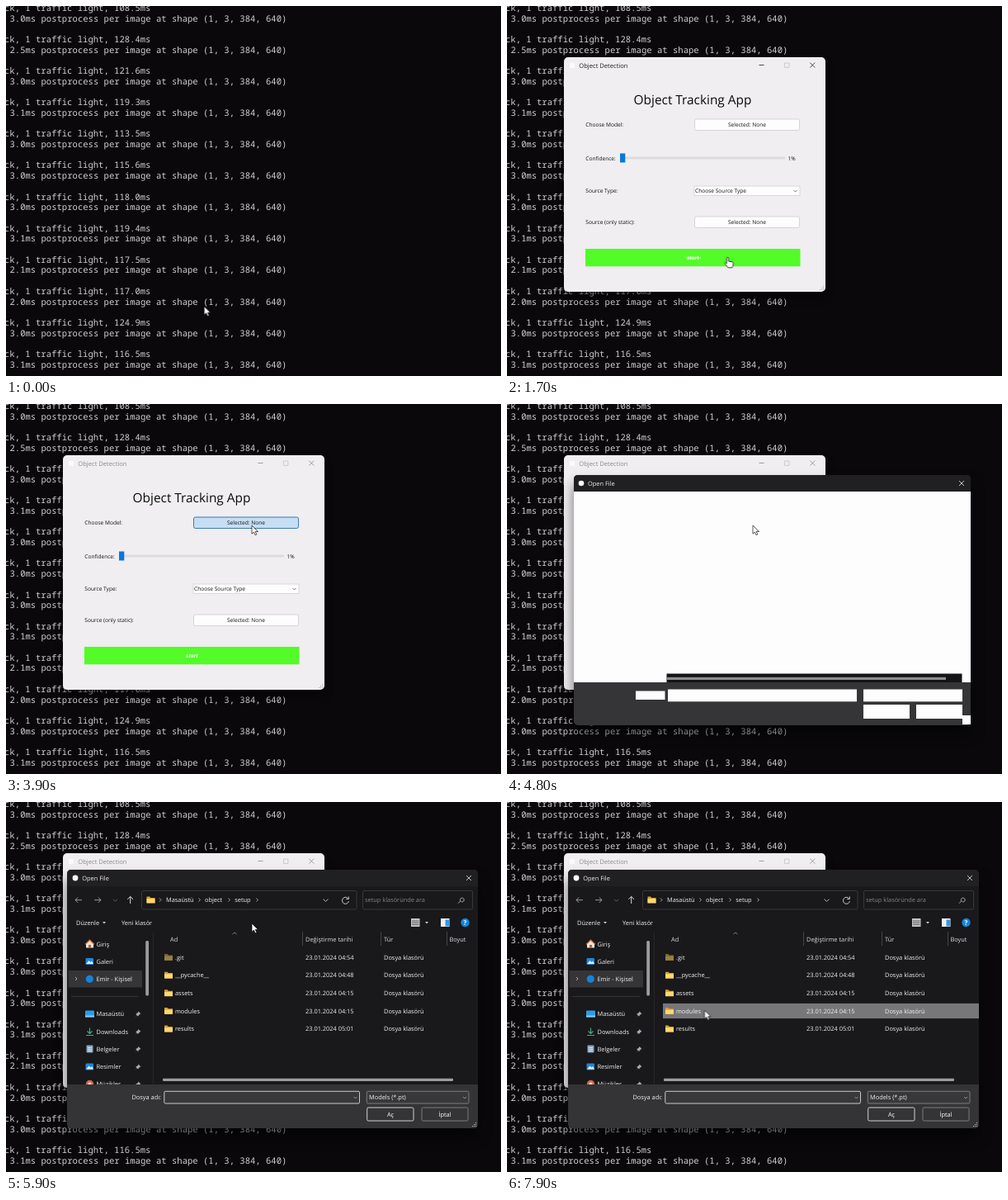
Animation, 600 px wide and 448 px high, one loop 8000 ms. Source, as an HTML page:

```html
<!DOCTYPE html>
<html lang="en">
<head>
<meta charset="utf-8">
<title>Object tracking demo</title>
<style>
  html, body { margin: 0; width: 100%; height: 100%; overflow: hidden; background: #0a080b; }
  svg { display: block; width: 600px; height: 448px; }
  text { font-family: "Open Sans", "Noto Sans", sans-serif; text-rendering: geometricPrecision; white-space: pre; }
  .mono { font-family: "Noto Sans Mono", "DejaVu Sans Mono", monospace; font-weight: 500; }
  filter { color-interpolation-filters: sRGB; }
  #app { transform-origin: 227.5px 204px; }
  #skeleton { transform-origin: 321.5px 237.5px; }
</style>
</head>
<body>
<svg id="stage" viewBox="0 0 600 448" xmlns="http://www.w3.org/2000/svg"></svg>
<script>
const LOOP = 8000, STEP = 100;

// Drawing helpers, each returning SVG markup
const text = (x, y, str, size = 7.4, fill = '#f1f0f2', more = '') =>
  `<text x="${x}" y="${y}" font-size="${size}" fill="${fill}" ${more}>${str}</text>`;
const mid = 'text-anchor="middle"';
const rect = (x, y, x2, y2, fill, more = '') =>
  `<rect x="${x}" y="${y}" width="${x2 - x}" height="${y2 - y}" fill="${fill}" ${more}/>`;
const line = (d, stroke = '#ddd', width = 0.9, more = '') =>
  `<path d="${d}" fill="none" stroke="${stroke}" stroke-width="${width}" ${more}/>`;
const circle = (x, y, r, fill) => `<circle cx="${x}" cy="${y}" r="${r}" fill="${fill}"/>`;
const group = (id, body, more = '') => `<g id="${id}" ${more}>${body}</g>`;
const cross = (x, y, color) => line(`M${x - 3} ${y - 3}l6 6m0-6l-6 6`, color, 0.8);
const down = (x, y, color = '#ccc', r = 2.5) => line(`M${x - r} ${y - r / 2}l${r} ${r}l${r}-${r}`, color, 0.8);
const right = (x, y, color = '#ccc') => line(`M${x - 1} ${y - 2}l2 2l-2 2`, color, 0.8);
const triangle = (x, y) => `<path d="M${x - 2} ${y - 1}h4l-2 2.4z" fill="#ccc"/>`;
const folder = (x, y, more = '') =>
  `<g ${more}><path d="M${x} ${y - 4}h3.6l1.2 1.4h5.2v6.6h-10z" fill="#d99d2b"/>` +
  `<path d="M${x} ${y - 1.4}h10v5.2h-10z" fill="#ffd870"/></g>`;
const grip = (x, y, color) => [[0, 0], [-2, 0], [-4, 0], [0, -2], [-2, -2], [0, -4]]
  .map(([dx, dy]) => rect(x + dx, y + dy, x + dx + 1, y + dy + 1, color)).join('');

function terminal() {
  const speeds = [108.5, 128.4, 121.6, 119.3, 113.5, 115.6, 118, 119.4, 117.5, 117, 124.9, 116.5];
  const posts = [3, 2.5, 3, 3.1, 3, 3, 3, 3.1, 2.1, 2, 3, 3.1];
  const row = (x, y, str) => text(x, y, str, 10.57, '#d2d0d3', 'class="mono"');
  return speeds.map((ms, i) => {
    const y = 5.8 + i * 38.12;
    return row(-2, y, `ck, 1 traffic light, ${ms.toFixed(1)}ms`) +
      row(4.5, y + 12.7, `${posts[i].toFixed(1)}ms postprocess per image at shape (1, 3, 384, 640)`);
  }).join('');
}

function appWindow() {
  const ink = '#151515';
  const label = (x, y, str, more) => text(x, y, str, 6.6, ink, more);
  const button = (y, id) =>
    rect(227.5, y, 354.5, y + 13.5, '#fdfdfd', `id="${id}" rx="2" stroke="#d2d0d3" stroke-width=".9"`) +
    label(291, y + 9.2, 'Selected: None', mid);
  return rect(69, 62, 386, 346, '#f0eef0', 'rx="5" filter="url(#shadow)"') +
    rect(76, 69, 82, 75, '#fbfafb') +
    text(87.3, 74.7, 'Object Detection', 7.6, 'currentColor') +
    line('M305.5 71.5h6', 'currentColor', 0.8) +
    line('M336.5 69h5.4v5.4h-5.4z', '#c4c2c5', 0.8) +
    cross(370.3, 71.6, 'currentColor') +
    text(225, 118.6, 'Object Tracking App', 15.4, '#0c0c0c', mid) +
    label(95.3, 146.2, 'Choose Model:') + button(137, 'model') +
    label(95.3, 187, 'Confidence:') + label(340.5, 187, '1%') +
    rect(137, 182.6, 337, 185.4, '#dcdadd') + rect(137, 178.5, 143.3, 189.5, '#0a78d6') +
    label(95.3, 226.2, 'Source Type:') +
    rect(227, 218, 355, 229.5, '#fdfdfd', 'stroke="#d2d0d3" stroke-width=".8"') +
    label(228, 226.2, 'Choose Source Type') + down(349.5, 224, '#555', 2) +
    label(95.3, 264.2, 'Source (only static):') + button(255, 'source') +
    rect(95, 294, 355.5, 315.3, '#53fb29') +
    text(225.5, 306.6, 'start', 6.4, '#fff', `${mid} font-weight="700" font-style="italic"`) +
    group('strike', line('M216 305h19', '#f4fff0', 0.8)) +
    grip(383, 343, '#aaa8ab');
}

function skeleton() {
  const blocks = [[156, 347.5, 191.5, 358], [195, 345.5, 424, 360.3], [432, 345.5, 552, 360.3],
    [432, 364, 488, 381], [496, 364, 552, 381], [552, 377, 562, 388]];
  return rect(81, 86, 562, 389, '#353436', 'rx="5" filter="url(#deepShadow)"') +
    `<path d="M81 106v-15q0-5 5-5h471q5 0 5 5v15z" fill="#201f21"/>` +
    circle(90, 96, 3.3, '#fff') + text(98, 98.8, 'Open File') + cross(551, 96, '#eee') +
    rect(81, 106, 562, 337, '#fdfdfe') + rect(193.5, 326.5, 551.5, 337, '#141315') +
    rect(194, 330.8, 532, 334, '#8e8d8f') +
    blocks.map(b => rect(...b, '#fdfdfe')).join('');
}

function sidebar() {
  const picture = y => rect(96.5, y - 4, 106, y + 4, '#1f86d8', 'rx="1"') +
    `<path d="M97 ${y + 3}l3.5-4 2 2 1.5-1.5 2 3.5z" fill="#dff1ff"/>`;
  const icons = {
    home: y => `<path d="M97 ${y}l4.5-4.5 4.5 4.5v4.5h-9z" fill="#f0e3d8"/>` +
      line(`M96 ${y + .4}l5.5-5.2 5.5 5.2`, '#e0733c', 1.3) + rect(100, y + 1, 103, y + 4.5, '#b0643c'),
    picture,
    cloud: y => circle(101.3, y, 4.6, '#1683d8'),
    desktop: y => rect(96, y - 4, 107, y + 4, '#2e9be6', 'rx="1"') + rect(96, y + 2, 107, y + 4, '#85cbf5'),
    download: y => line(`M101.5 ${y - 4.5}v7m-3-3l3 3 3-3M97 ${y + 4.5}h9`, '#3fae7c', 1.2),
    page: y => rect(97.5, y - 4.5, 105.5, y + 4.5, '#8ba5bd', 'rx="1"') +
      line(`M99 ${y - 1.5}h5m-5 2h5m-5 2h5`, '#eef4fa', 0.8),
    music: y => circle(101.5, y, 4.7, '#d66a50') + circle(101.5, y, 2, '#ffe7dc')
  };
  const pin = y => `<path d="M160.5 ${y - 3}l3 3-1.5.5-2 2.5-1.2-1.2-2.3 2.2 2-2.5-1.3-1.2 2.7-1.8z" fill="#a9a8aa"/>`;
  const items = [['home', 'Giriş', 172], ['picture', 'Galeri', 193], ['cloud', 'Emir - Kişisel', 214.3],
    ['desktop', 'Masaüstü', 256.5], ['download', 'Downloads', 278], ['page', 'Belgeler', 299],
    ['picture', 'Resimler', 320.5], ['music', 'Müzikler', 341.5]];
  return rect(75.5, 204, 165, 224.5, '#353436') + right(85, 214) +
    items.map(([icon, name, y]) => icons[icon](y) + text(109.5, y + 2.7, name) + (y > 250 ? pin(y) : '')).join('') +
    line('M79 235.5h82', '#3b3a3c', 0.8) + rect(169.2, 168, 173, 234.5, '#9c9b9d', 'rx="1.5"');
}

function fileList() {
  const rows = [['.git', '04:54'], ['__pycache__', '04:48'], ['assets', '04:15'], ['modules', '04:15'], ['results', '05:01']];
  const titles = [[199, 'Ad'], [363, 'Değiştirme tarihi'], [458, 'Tür'], [537.5, 'Boyut']];
  return rect(189, 178.9, 572, 197.1, '#4d4c4e', 'id="hover"') +
    titles.map(([x, name]) => text(x, 168.7, name, 7.4, '#dddcde')).join('') +
    line('M274.5 160l2.5-2 2.5 2', '#aaa', 0.7) +
    line('M359.5 157v17M454.5 157v17M534.5 157v17', '#4a494b', 0.9) +
    rows.map(([name, time], i) => {
      const y = 188 + i * 21.65;
      return folder(192, y, i ? '' : 'opacity=".55"') + text(205, y + 2.7, name) +
        text(363, y + 2.7, '23.01.2024 ' + time) + text(458, y + 2.7, 'Dosya klasörü');
    }).join('') +
    rect(190, 334.7, 542, 338, '#9c9b9d', 'rx="1"');
}

function dialog() {
  const box = (x, y, x2, y2, stroke, fill = 'none') =>
    rect(x, y, x2, y2, fill, `rx="1.5" stroke="${stroke}" stroke-width=".9"`);
  const crumbs = [[194, 'Masaüstü', 234.5], [241, 'object', 270.5], [277.3, 'setup', 304.5]];
  return rect(74, 82, 572, 395, '#19181a', 'rx="5" filter="url(#deepShadow)"') +
    `<path d="M74 102v-15q0-5 5-5h488q5 0 5 5v15z" fill="#201f21"/>` +
    circle(84, 92, 3.4, '#fff') + text(92.3, 94.8, 'Open File') + cross(561, 92, '#eee') +
    line('M92 118.7h-8m3.2-3.2l-3.2 3.2 3.2 3.2', '#a9a8aa') +
    line('M107 118.7h8m-3.2-3.2l3.2 3.2-3.2 3.2', '#a9a8aa') +
    down(132.5, 119, '#777') + line('M150.7 123v-8.5m-3.4 3.4l3.4-3.4 3.4 3.4', '#eee') +
    box(164.5, 107.5, 425, 130, '#3d3c3e') + folder(170.5, 118.5) + right(187, 118.5) +
    crumbs.map(([x, name, arrow]) => text(x, 121.3, name) + right(arrow, 118.5)).join('') +
    down(387.5, 119, '#ddd', 3) +
    line('M414.7 117a4 4 0 1 0 .7 3M415.3 114.5v3h-3', '#ddd') +
    box(432.5, 107.5, 565.5, 130, '#3d3c3e') + text(435, 121.3, 'setup klasöründe ara', 7.4, '#858487') +
    line('M548 122.7l2.8-2.8a2.4 2.4 0 1 1 .6.6', '#bbb') +
    text(85, 149, 'Düzenle') + triangle(119, 146) + text(140, 149, 'Yeni klasör') +
    rect(491, 141, 501.5, 151, '#c4c3c5') + line('M492 144h8.5m-8.5 2.2h8.5m-8.5 2.2h8.5', '#3a393b', 0.7) + triangle(510, 146) +
    rect(527, 141, 537.5, 151, '#f0f0f2') + rect(532.5, 142.5, 537, 150.5, '#2f9be8') +
    circle(556.5, 146, 5.2, '#0f86dd') + text(556.5, 148.8, '?', 8, '#fff', mid + ' font-weight="700"') +
    line('M178.5 157v185', '#2c2b2d', 0.8) +
    sidebar() + fileList() +
    `<path d="M74 342h498v48q0 5-5 5h-488q-5 0-5-5z" fill="#343335"/>` +
    text(152.4, 360.3, 'Dosya adı:') + box(191.8, 350.3, 428.5, 365, '#dcdbdd', '#38373a') +
    rect(193.4, 352.5, 194.2, 362.5, '#fff', 'id="caret"') + down(423.5, 358, '#aaa', 2) +
    box(437.3, 350.3, 561, 365, '#858486', '#38373a') + text(440, 360.3, 'Models (*.pt)') + down(556, 358, '#aaa', 2) +
    box(437.7, 370, 494, 386, '#e4e3e5') + text(466, 380.6, 'Aç', 7.4, '#fff', mid) +
    box(504, 370, 560, 386, '#858486') + text(532, 380.6, 'İptal', 7.4, '#fff', mid) +
    grip(569, 392, '#ccc');
}

const pointer =
  group('arrow', '<path d="M0 0v10.2l2.4-2.1 1.7 3.6 1.7-.8-1.6-3.4h3.3z" fill="#fff" stroke="#111" stroke-width=".7"/>') +
  group('hand', '<path d="M-1.2 1q1.2-1.8 2.2 0v4l5 1q1 .3.9 2l-.7 3.2-.8 1.6h-5l-3-4q-1.4-2 0-2.2l1.4 1.2z" fill="#fff" stroke="#111" stroke-width=".8"/>');

const shadow = (id, dy, blur, alpha) =>
  `<filter id="${id}" x="-20%" y="-20%" width="140%" height="150%">
    <feDropShadow dx="0" dy="${dy}" stdDeviation="${blur}" flood-opacity="${alpha}"/></filter>`;

document.getElementById('stage').innerHTML =
  `<defs>${shadow('shadow', 7, 5, 0.5)}${shadow('deepShadow', 11, 8, 0.55)}</defs>` +
  rect(0, 0, 600, 448, '#0a080b') + terminal() + group('app', appWindow()) +
  group('skeleton', skeleton()) + group('dialog', dialog()) + group('pointer', pointer);

// Rows are [time, properties]; each holds until the next one
function play(id, rows) {
  const frames = rows.map(([t, props]) => ({ offset: t / LOOP, easing: 'step-end', ...props }));
  frames.push({ ...frames.at(-1), offset: 1 });
  document.getElementById(id).animate(frames, { duration: LOOP, iterations: Infinity });
}
const toggle = (id, ...times) =>
  play(id, [0, ...times].map((t, i) => [t, { opacity: i % 2 }]));

const route = [[0, 240.3, 363.7], [1400, 240.3, 363.7], [1700, 267.5, 304], [2100, 268, 303.5],
  [3000, 298, 147], [5900, 298, 147], [6400, 248, 230.3], [6900, 248, 230.3], [7200, 239.5, 252.3], [LOOP, 239.5, 252.3]];

function pointerAt(t) {
  const i = route.findIndex(([end]) => end > t);
  const [t0, x0, y0] = route[i - 1], [t1, x1, y1] = route[i];
  const u = (t - t0) / (t1 - t0), s = u * u * (3 - 2 * u);
  return `translate(${x0 + (x1 - x0) * s}px, ${y0 + (y1 - y0) * s}px)`;
}

play('pointer', Array.from({ length: LOOP / STEP }, (_, i) => [i * STEP, { transform: pointerAt(i * STEP) }]));
play('arrow', [[0, { opacity: 1 }], [1700, { opacity: 0 }], [2300, { opacity: 1 }]]);
toggle('hand', 1700, 2300);
toggle('strike', 1700, 2300);
play('app', [
  [0, { opacity: 0, transform: 'scale(.95)', color: '#222' }],
  [500, { opacity: 0.5, transform: 'scale(.96)', color: '#222' }],
  [600, { opacity: 1, transform: 'none', color: '#222' }],
  [3800, { opacity: 1, transform: 'none', color: '#8c8a8d' }]
]);
play('model', [
  [0, { fill: '#fdfdfd', stroke: '#d2d0d3' }],
  [3000, { fill: '#e2eefa', stroke: '#3a8fd6' }],
  [3500, { fill: '#c6def4', stroke: '#2a6fa8' }]
]);
play('skeleton', [
  [0, { opacity: 0, transform: 'scale(.95)' }],
  [4700, { opacity: 0.5, transform: 'scale(.95)' }],
  [4800, { opacity: 1, transform: 'none' }],
  [4900, { opacity: 1, transform: 'translate(1.5px, 1px) scale(1.035)' }],
  [5000, { opacity: 0, transform: 'none' }]
]);
toggle('dialog', 5000);
toggle('caret', 5000, 5500, 6000, 6500, 7100, 7600);
const hoverRow = (row, fill = '#4d4c4e') => ({ opacity: 1, fill, transform: `translateY(${row * 21.65}px)` });
play('hover', [
  [0, { ...hoverRow(0), opacity: 0 }],
  [6200, hoverRow(1)],
  [6300, hoverRow(2)],
  [7100, hoverRow(3)],
  [7400, hoverRow(3, '#777678')]
]);
</script>
</body>
</html>
```
